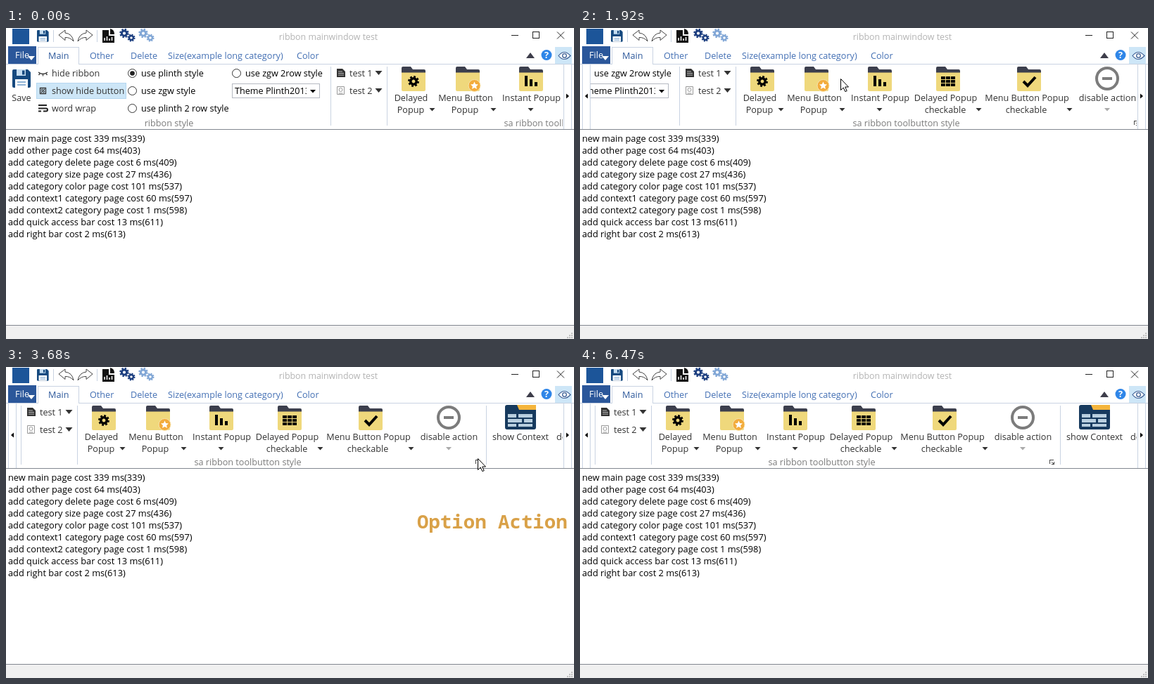
An HTML page for the animation above (7400 ms loop, 807x443 px).

```html
<!DOCTYPE html>
<html lang="en">
<head>
<meta charset="utf-8">
<title>Ribbon main window</title>
<style>
html, body { margin: 0; width: 100%; height: 100%; overflow: hidden; background: #fff; }
svg { display: block; width: 807px; height: 443px; font: 12.65px "Open Sans", "Noto Sans", sans-serif; }
.px { shape-rendering: crispEdges; }
.mid { text-anchor: middle; }
.title { fill: #b3b3b3; font-size: 12.4px; }
.tabs { fill: #4470b4; }
.label { fill: #333; }
.group { fill: #7b7b7b; }
.log { font-size: 12.8px; }
.line { fill: none; stroke: #c9d3e2; }
.radio { fill: #fff; stroke: #333; }
.hot { fill: #cde6f7; }

.anim { animation: 7400ms step-end infinite; }
#scroll { animation-name: scroll; }
#back { animation-name: back; }
#radio { animation-name: radio; }
#hover1 { animation-name: hover1; }
#hover2 { animation-name: hover2; }
#option { animation-name: option; }
#caption { animation-name: caption; }
#dialog { animation-name: dialog; transform-origin: 403px 205px; }
#ok { animation-name: ok; }
#cursor { animation-name: cursor; }
#arrow { animation-name: arrow; }
#beam { animation-name: beam; }

@keyframes scroll {
  0% { transform: translateX(0); }
  16.75% { transform: translateX(-40px); }
  17.56% { transform: translateX(-80px); }
  18.51% { transform: translateX(-120px); }
  19.45% { transform: translateX(-200px); }
  20.4% { transform: translateX(-240px); }
  21.21% { transform: translateX(-280px); }
  25.94% { transform: translateX(-320px); }
  27.7% { transform: translateX(-400px); }
  28.64%, 100% { transform: translateX(-440px); }
}
@keyframes back { 0% { opacity: 0; } 16.75%, 100% { opacity: 1; } }
@keyframes radio {
  0% { stroke: #333; }
  11.21% { stroke: #22598c; }
  12.16% { stroke: #0078d7; }
  17.56%, 100% { stroke: #333; }
}
@keyframes hover1 { 0% { opacity: 0; } 33.91% { opacity: 1; } 34.86%, 100% { opacity: 0; } }
@keyframes hover2 { 0% { opacity: 0; } 34.86% { opacity: 1; } 36.75%, 100% { opacity: 0; } }
@keyframes option {
  0% { opacity: 0; fill: #cde6f7; }
  37.7% { opacity: 1; fill: #cde6f7; }
  47.83% { opacity: 1; fill: #92c0e0; }
  49.7%, 100% { opacity: 0; fill: #cde6f7; }
}
@keyframes caption {
  0% { opacity: 0; }
  37.7% { opacity: 0; animation-timing-function: steps(5); }
  42.43% { opacity: 1; }
  66.2% { opacity: 1; animation-timing-function: steps(4); }
  69.86%, 100% { opacity: 0; }
}
@keyframes dialog {
  0% { opacity: 0; transform: scale(.94); }
  49.7% { opacity: 0; transform: scale(.94); animation-timing-function: steps(4); }
  53.51% { opacity: 1; transform: none; }
  67.02% { opacity: 1; transform: none; animation-timing-function: steps(4); }
  70.8%, 100% { opacity: 0; transform: scale(.94); }
}
@keyframes ok {
  0% { fill: #e1e1e1; }
  61.6% { fill: #e5f1fb; }
  65.2% { fill: #cce4f7; }
  67%, 100% { fill: #e1e1e1; }
}
@keyframes cursor {
  0% { transform: translate(707px, 423px); }
  1.75% { transform: translate(707px, 423px); animation-timing-function: steps(5); }
  6.75% { transform: translate(435px, 138px); animation-timing-function: steps(5); }
  11.21% { transform: translate(370px, 72px); }
  32.97% { transform: translate(370px, 72px); animation-timing-function: steps(4); }
  36.75% { transform: translate(649px, 116px); }
  37.7% { transform: translate(670px, 130px); }
  55.27% { transform: translate(670px, 130px); animation-timing-function: steps(3); }
  57.96% { transform: translate(504px, 217px); }
  59.87% { transform: translate(504px, 217px); animation-timing-function: steps(3); }
  62.56% { transform: translate(490px, 244px); }
  80.8% { transform: translate(490px, 244px); animation-timing-function: steps(6); }
  86.48%, 100% { transform: translate(750px, 421px); }
}
@keyframes arrow { 0% { opacity: 0; } 6.75% { opacity: 1; } 70.8%, 100% { opacity: 0; } }
@keyframes beam {
  0% { opacity: 0; }
  1.75% { opacity: 1; }
  6.75% { opacity: 0; }
  70.8% { opacity: 1; }
  87.43%, 100% { opacity: 0; }
}
</style>
</head>
<body>
<svg viewBox="0 0 807 443">
<defs>
  <clipPath id="view"><rect x="3" y="51" width="788" height="93"/></clipPath>
  <filter id="shadow" x="-20%" y="-20%" width="140%" height="150%">
    <feGaussianBlur stdDeviation="5"/>
  </filter>
  <path id="drop" d="M-4 -2H4L0 2.5z"/>
  <path id="drop2" d="M-5 -3H5L0 3z"/>
  <g id="folder">
    <path d="M0 9V2q0-2 2-2h11l3 4h16q2 0 2 2v4z" fill="#3c3f4d"/>
    <path d="M0 8.500h34v24.500q0 2-2 2H2q-2 0-2-2z" fill="#efd87c"/>
  </g>
  <g id="gear" fill="none" stroke="currentColor">
    <circle r="4.2" stroke-width="3.6"/>
    <circle r="6.6" stroke-width="2.6" stroke-dasharray="2.8 2.384"/>
  </g>
  <g id="gears">
    <use href="#gear" transform="translate(7 7.500) scale(.85)"/>
    <use href="#gear" transform="translate(17 14) scale(.7)"/>
  </g>
  <g id="disk">
    <path d="M0 2q0-2 2-2h20l4 4v20q0 2-2 2H2q-2 0-2-2z" fill="#15497f"/>
    <path d="M6 0h13v9H6z" fill="#c4dcf0"/>
    <path d="M14 1.5h3.5v6H14z" fill="#15497f"/>
    <path d="M4 14h18v12H4z" fill="#fff"/>
    <path d="M7 17h12v2H7zM7 21h12v2H7z" fill="#8fb3d6"/>
  </g>
  <g id="turn" fill="#fff" stroke="#444" stroke-linejoin="round">
    <path d="M0 7L9 0v4q10 1 12 12q-5-6-12-5.500v4z"/>
  </g>
</defs>

<rect width="807" height="443" fill="#fff"/>

<!-- title bar -->
<rect x="9" y="1" width="24" height="22" fill="#1c5599"/>
<use href="#disk" transform="translate(44 3) scale(.64)"/>
<path class="px line" d="M67.500 3v17M129.500 3v17"/>
<use href="#turn" x="75" y="3"/>
<use href="#turn" transform="translate(123 3) scale(-1 1)"/>
<path d="M137 3h9v8h8v10h-17z" fill="#111"/>
<path d="M148 1q6 1 6 8h-6z" fill="#111"/>
<path d="M140 18v-4M143.500 18v-6M147 18v-3M150.500 18v-5" stroke="#fff" stroke-width="1.500"/>
<use href="#gears" x="161" color="#1d3f80"/>
<use href="#gears" x="188" color="#82a7d6"/>
<text class="mid title" x="458" y="16.500">ribbon mainwindow test</text>
<path class="px" d="M718 10.500h10M748.500 5.500h9v9h-9z" fill="none" stroke="#222"/>
<path d="M783 5.500l10 10M793 5.500l-10 10" stroke="#222"/>

<!-- tabs -->
<path class="px line" d="M0 51.500H45.500V27.500H103.500V51.500H807"/>
<rect class="px" x="3" y="26" width="40" height="25" fill="#2b579a"/>
<text x="13" y="43" fill="#fff">File</text>
<use href="#drop2" x="36" y="43" fill="#fff"/>
<g class="tabs">
  <text x="60" y="43.500" fill="#2b579a">Main</text>
  <text x="119" y="43.500">Other</text>
  <text x="177" y="43.500">Delete</text>
  <text x="230" y="43.500">Size(example long category)</text>
  <text x="413" y="43.500">Color</text>
</g>
<path d="M739 43l6-8 6 8z" fill="#3d3d4a"/>
<circle cx="768" cy="38.500" r="7.500" fill="#2f86e8"/>
<text class="mid" x="768" y="43" fill="#fff" font-weight="bold">?</text>
<rect class="px hot" x="780" y="27" width="24" height="24"/>
<path d="M785 39.500q8-10 17 0q-9 10-17 0z" fill="#fff" stroke="#3d6096" stroke-width="1.200"/>
<circle cx="793.500" cy="39.500" r="2.800" fill="none" stroke="#3d6096" stroke-width="1.300"/>

<!-- ribbon -->
<g clip-path="url(#view)">
  <rect id="hover1" class="px hot anim" x="354" y="53" width="100" height="74"/>
  <rect id="hover2" class="px hot anim" x="455" y="53" width="129" height="74"/>
  <rect id="option" class="px anim" x="664" y="128" width="14" height="14"/>
  <g id="scroll" class="anim">
    <use href="#disk" x="9" y="59"/>
    <rect class="px" x="43.500" y="78.500" width="127" height="22" fill="#cde6f7" stroke="#b5d7f0"/>
    <path d="M46 63q6.500 5 13 0M48 65l-1.500 2M52.500 66v2.500M57 65l1.500 2" fill="none" stroke="#333" stroke-width="1.300"/>
    <path d="M48.500 85.500h8v8h-8zM50 92l5-5M50 89l2-2M53 92l2-2" fill="none" stroke="#333" stroke-width="1.300"/>
    <path d="M46 110h12M46 114.500h11q2 0 2 2t-2 2h-4M46 118.500h4" fill="none" stroke="#222" stroke-width="2"/>
    <g class="label">
      <text class="mid" x="22" y="104">Save</text>
      <text x="65" y="69">hide ribbon</text>
      <text x="65" y="94">show hide button</text>
      <text x="65" y="119">word wrap</text>
    </g>
    <g class="radio">
      <circle cx="179.500" cy="64.500" r="6"/>
      <circle cx="179.500" cy="89.500" r="6"/>
      <circle cx="179.500" cy="114.500" r="6"/>
      <circle id="radio" class="anim" cx="327.500" cy="64.500" r="6"/>
    </g>
    <circle cx="179.500" cy="64.500" r="3.300" fill="#222"/>
    <text x="192" y="69">use plinth style</text>
    <text x="192" y="94">use zgw style</text>
    <text x="192" y="119">use plinth 2 row style</text>
    <text x="340" y="69">use zgw 2row style</text>
    <rect class="px" x="321.500" y="79.500" width="124" height="20" fill="#fff" stroke="#b5b9c2"/>
    <svg x="325" y="80" width="102" height="19"><text y="14">Theme Plinth2013</text></svg>
    <use href="#drop" x="436" y="90"/>

    <path class="px line" d="M461.500 55v84M541.500 55v84M1122.500 55v84"/>
    <path d="M470 58h8l4 4v8h-12z" fill="#333"/>
    <path d="M472 62h6M472 64.500h8M472 67h8" stroke="#bbb"/>
    <path d="M470.500 83.500h10v11h-10zM472.500 93h6" fill="#fff" stroke="#999"/>
    <circle cx="475.500" cy="88" r="2.500" fill="none" stroke="#999"/>
    <g class="label">
      <text x="488" y="69">test 1</text>
      <text x="488" y="94">test 2</text>
      <use href="#drop2" x="529.500" y="64"/>
      <use href="#drop2" x="529.500" y="89"/>
    </g>

    <use href="#folder" x="562" y="55"/>
    <use href="#gear" x="579" y="76"/>
    <use href="#folder" x="639" y="55"/>
    <circle cx="665.500" cy="82" r="8.500" fill="#f3ac3c" stroke="#f7e3ae"/>
    <path d="M665.500 76.500l1.600 3.600 3.900.4-2.900 2.600.8 3.900-3.400-2-3.400 2 .8-3.900-2.900-2.600 3.900-.4z" fill="#fff"/>
    <use href="#folder" x="729" y="55"/>
    <path class="px" d="M737 68h4v15h-4zM744 73h4v10h-4zM751 77h4v6h-4z"/>
    <use href="#folder" x="826" y="55"/>
    <path class="px" d="M833 69h6v4h-6zM840 69h6v4h-6zM847 69h6v4h-6zM833 74h6v4h-6zM840 74h6v4h-6zM847 74h6v4h-6zM833 79h6v4h-6zM840 79h6v4h-6zM847 79h6v4h-6z"/>
    <use href="#folder" x="941" y="55"/>
    <path d="M950 76l6 6 11-12" fill="none" stroke="#000" stroke-width="4"/>
    <g fill="none" stroke="#7c7c7c" stroke-width="4">
      <circle cx="1069" cy="72" r="15"/>
      <path d="M1062 72h14"/>
    </g>
    <path d="M1165 54h28v9h-28z" fill="#f5b53c"/>
    <path d="M1149 57q0-3 3-3h14l3 7h24v25q0 3-3 3h-38q-3 0-3-3z" fill="#173a5e"/>
    <path class="px" d="M1153 67h12v5h-12zM1168 67h20v5h-20zM1153 74h20v5h-20zM1176 74h12v5h-12zM1153 81h12v4h-12zM1168 81h20v4h-20z" fill="#b9cfdf"/>

    <g class="label mid">
      <text x="575.500" y="104">Delayed</text><text x="575" y="121">Popup</text>
      <text x="653" y="104">Menu Button</text><text x="652" y="121">Popup</text>
      <text x="746.500" y="104">Instant Popup</text>
      <text x="839.500" y="104">Delayed Popup</text><text x="839" y="121">checkable</text>
      <text x="955" y="104">Menu Button Popup</text><text x="954" y="121">checkable</text>
      <text x="1069.500" y="104">disable action</text>
      <text x="1171" y="104">show Context</text>
      <text x="1222" y="104" text-anchor="start">delete Context</text>
      <use href="#drop" x="605.500" y="116"/>
      <use href="#drop" x="692.500" y="116"/>
      <use href="#drop" x="745.500" y="116"/>
      <use href="#drop" x="886.500" y="116"/>
      <use href="#drop" x="1015.500" y="116"/>
      <use href="#drop" x="1069" y="116" fill="#aaa"/>
    </g>
    <g class="group mid">
      <text x="231.500" y="140">ribbon style</text>
      <text x="783.500" y="140">sa ribbon toolbutton style</text>
    </g>
    <path class="px" d="M1107.500 138v-5.500h5M1110 135l3 3M1113.500 135v3.500h-4" fill="none" stroke="#444"/>
  </g>
</g>
<g id="back" class="anim">
  <rect x="0" y="52" width="15" height="92" fill="#fff"/>
  <path class="px line" d="M3.500 52v92M14.500 52v92"/>
  <path d="M11 93.500v7l-4-3.500z"/>
</g>
<path class="px line" d="M792.500 52v92M803.500 52v92"/>
<path d="M796 93.500v7l4-3.500z"/>

<!-- log and status bar -->
<path class="px" d="M0 144.500h807" stroke="#828790"/>
<g class="log">
  <text x="3" y="162">new main page cost 339 ms(339)</text>
  <text x="3" y="179">add other page cost 64 ms(403)</text>
  <text x="3" y="196">add category delete page cost 6 ms(409)</text>
  <text x="3" y="213">add category size page cost 27 ms(436)</text>
  <text x="3" y="230">add category color page cost 101 ms(537)</text>
  <text x="3" y="247">add context1 category page cost 60 ms(597)</text>
  <text x="3" y="264">add context2 category page cost 1 ms(598)</text>
  <text x="3" y="281">add quick access bar cost 13 ms(611)</text>
  <text x="3" y="298">add right bar cost 2 ms(613)</text>
</g>
<rect y="423" width="807" height="20" fill="#f0f0f0"/>
<path class="px" d="M0 423.500h807" stroke="#828790"/>
<path class="px" d="M803 434h2v2h-2zM800 437h2v2h-2zM803 437h2v2h-2zM797 440h2v2h-2zM800 440h2v2h-2zM803 440h2v2h-2z" fill="#bfbfbf"/>

<text id="caption" class="anim" x="584" y="230" fill="#d9a148" font-family="'Noto Sans Mono', monospace" font-size="27.400" font-weight="600">Option Action</text>

<!-- message box -->
<g id="dialog" class="anim">
  <rect x="295" y="146" width="217" height="125" opacity=".35" filter="url(#shadow)"/>
  <rect class="px" x="295.500" y="142.500" width="216" height="125" fill="#fff" stroke="#6e6e6e"/>
  <rect class="px" x="296" y="222" width="215" height="45" fill="#f0f0f0"/>
  <path class="px" d="M296 222.500h215" stroke="#dfdfdf"/>
  <rect x="304" y="150" width="16" height="15" fill="#1c5599"/>
  <text x="325" y="162">Option Action Triggered</text>
  <path d="M491 152l10 10M501 152l-10 10" stroke="#222"/>
  <circle cx="323" cy="200" r="14.500" fill="#0078d7" stroke="#0a5a9c"/>
  <path d="M323 196v13M323 191v2.500" stroke="#fff" stroke-width="2.200"/>
  <text x="358" y="197">Option Action Triggered</text>
  <rect id="ok" class="px anim" x="427" y="233" width="71" height="21" fill="#e1e1e1" stroke="#0078d7" stroke-width="2"/>
  <text class="mid" x="462" y="248">OK</text>
</g>

<g id="cursor" class="anim">
  <path id="arrow" class="anim" d="M.5.5v16l3.700-3.500 2.600 5.600 2.400-1-2.500-5.600h4.800z" fill="#fff" stroke="#000"/>
  <path id="beam" class="anim px" d="M-3 -7.500h2.500M1.500 -7.500H4M.5 -7V7M-3 7.500h2.500M1.500 7.500H4" fill="none" stroke="#444"/>
</g>
</svg>
</body>
</html>
```
